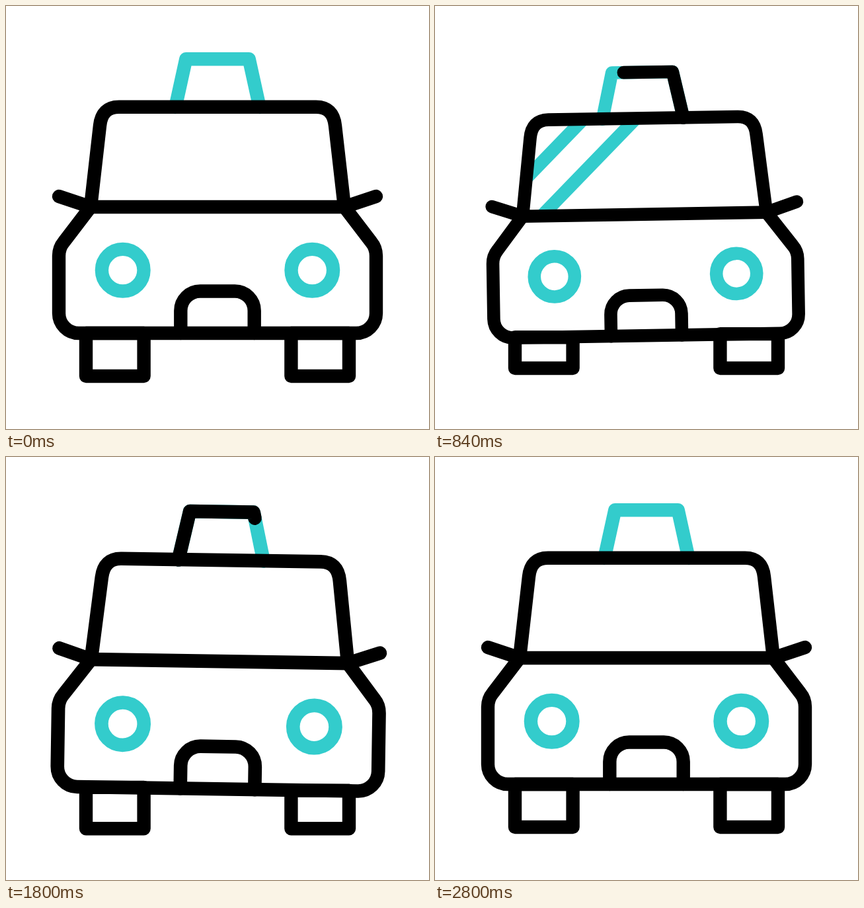
Recreate the animation shown at these times as an HTML page with a canvas. Size 640 by 640 pixels, loop 3 s.

```html
<!DOCTYPE html>
<html lang="en">
<head>
<meta charset="utf-8">
<title>Taxi</title>
<style>
  html, body { margin: 0; height: 100%; overflow: hidden; background: #fff; }
  canvas { display: block; width: 640px; height: 640px; }
</style>
</head>
<body>
<canvas id="stage" width="640" height="640"></canvas>
<script>
const ctx = document.getElementById('stage').getContext('2d');
const LOOP = 3000, BLACK = '#000', TEAL = '#33cccc', LINE = 20.4;
const PIVOT = { x: 320, y: 495 };

const cabin = new Path2D('M128 304L142 181Q145 152.7 171 152.7H469Q495 152.7 498 181L512 304Z');
const hull = new Path2D('M128 304L87.5 357Q80 366 80 378V465A30 30 0 0 0 110 495H530' +
  'A30 30 0 0 0 560 465V378Q560 366 552.5 357L512 304');
const mirrors = new Path2D('M80 288L128 304M560 288L512 304');
const grille = new Path2D('M264.3 495V461A29.5 29.5 0 0 1 293.8 431.5H346.2A29.5 29.5 0 0 1 375.7 461V495');
const sign = new Path2D('M256.3 153L272.3 80.3H367.7L383.7 153');
const SIGN_LENGTH = 2 * Math.hypot(16, 72.7) + 95.4;

const lights = new Path2D();
for (const x of [176.7, 463.3]) {
  lights.moveTo(x + 31.8, 399.7);
  lights.arc(x, 399.7, 31.8, 0, 7);
}

// Keyframes as [time, value], linear in between
const scaleKeys = [[140, 1], [1040, 0.95], [1920, 1.021], [2800, 1]];
const tiltKeys = [[140, 0], [1040, -1.2], [1920, 1.2], [2800, 0]];
const wheelKeys = [[140, 560], [1040, 544.5], [1920, 565], [2800, 560]];
const dropKeys = [[140, 0], [540, 11.2], [1030, -1], [1600, 12], [2100, 0.2], [2800, 0]];

function ramp(t, from, to) {
  return Math.min(1, Math.max(0, (t - from) / (to - from)));
}

function valueAt(keys, t) {
  let value = keys[0][1];
  for (let i = 1; i < keys.length; i++) {
    const [from, a] = keys[i - 1], [to, b] = keys[i];
    value += (b - a) * ramp(t, from, to);
  }
  return value;
}

function stroke(path, color) {
  ctx.strokeStyle = color;
  ctx.stroke(path);
}

function drawWheel(x, bottom, top) {
  const wheel = new Path2D();
  wheel.rect(x, top, 87.6, bottom - top);
  stroke(wheel, BLACK);
}

// Black line running along the roof sign
function drawTrace(t, start) {
  const head = ramp(t, start, start + 400);
  const tail = ramp(t, start + 353, start + 753);
  if (head <= tail) return;
  ctx.setLineDash([(head - tail) * SIGN_LENGTH, 999]);
  ctx.lineDashOffset = -tail * SIGN_LENGTH;
  stroke(sign, BLACK);
  ctx.setLineDash([]);
}

// Three diagonal reflections sweeping across the windscreen
function drawReflections(t) {
  const stripes = new Path2D();
  for (let i = 0; i < 3; i++) {
    const sum = 540 + 0.68 * (t - 1200) + 83 * i;
    stripes.moveTo(sum - 120, 120);
    stripes.lineTo(sum - 340, 340);
  }
  ctx.save();
  ctx.clip(cabin);
  stroke(stripes, TEAL);
  ctx.restore();
}

function draw(t) {
  const scale = valueAt(scaleKeys, t);
  const tilt = valueAt(tiltKeys, t) * Math.PI / 180;
  const baseY = PIVOT.y + valueAt(dropKeys, t);
  const wheelY = valueAt(wheelKeys, t);

  ctx.fillStyle = '#fff';
  ctx.fillRect(0, 0, 640, 640);
  ctx.lineWidth = LINE;
  ctx.lineCap = ctx.lineJoin = 'round';

  for (const x of [121, 431.4]) {
    drawWheel(x, wheelY, baseY + (x + 43.8 - PIVOT.x) * Math.tan(tilt));
  }

  ctx.save();
  ctx.translate(PIVOT.x, baseY);
  ctx.rotate(tilt);
  ctx.scale(scale, scale);
  ctx.translate(-PIVOT.x, -PIVOT.y);
  stroke(sign, TEAL);
  drawTrace(t, 336);
  drawTrace(t, 1508);
  drawReflections(t);
  stroke(lights, TEAL);
  for (const part of [mirrors, cabin, hull, grille]) stroke(part, BLACK);
  ctx.restore();
}

function tick() {
  draw(performance.now() % LOOP);
  requestAnimationFrame(tick);
}
tick();
</script>
</body>
</html>
```
